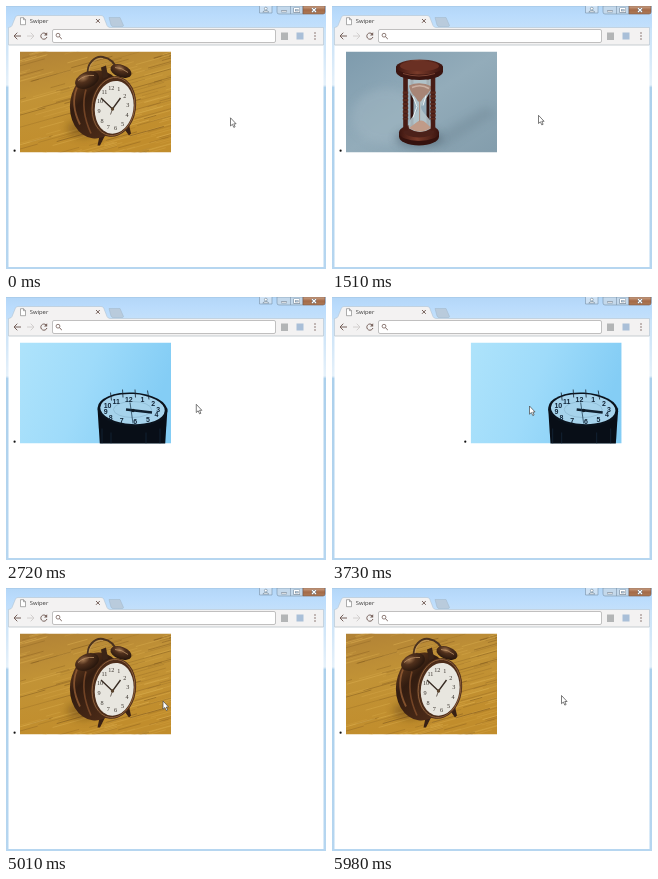
Recreate the animation shown at these times as an HTML page. Size 320x263 px, loop 6280 ms.

```html
<!DOCTYPE html>
<html lang="en">
<head>
<meta charset="utf-8">
<title>Swiper</title>
<style>
  html, body { margin: 0; width: 100%; height: 100%; overflow: hidden; background: #fff; }
  svg { display: block; width: 100vw; height: 100vh; }
  text { font-family: "Open Sans", "Noto Sans", sans-serif; }
  .num { font-family: "Liberation Serif", serif; text-anchor: middle; }
  .icon { fill: none; stroke: #75605a; stroke-width: 1; }
</style>
</head>
<body>
<svg viewBox="0 0 320 263">
  <defs>
    <linearGradient id="bar" x2="0" y2="1">
      <stop offset="0" stop-color="#b3d6f7"/><stop offset=".4" stop-color="#b9dbfc"/><stop offset="1" stop-color="#c3e0fb"/>
    </linearGradient>
    <linearGradient id="edge" x2="0" y2="1">
      <stop offset="0" stop-color="#c0dffa"/><stop offset=".18" stop-color="#d3e7f8"/>
      <stop offset=".3" stop-color="#e6f1fa"/><stop offset=".31" stop-color="#acd0ec"/><stop offset="1" stop-color="#b6d6f0"/>
    </linearGradient>
    <linearGradient id="close" x2="0" y2="1">
      <stop offset="0" stop-color="#cda487"/><stop offset=".5" stop-color="#a46a48"/><stop offset="1" stop-color="#ad7a55"/>
    </linearGradient>
    <linearGradient id="wood" x2=".3" y2="1">
      <stop offset="0" stop-color="#b18236"/><stop offset=".45" stop-color="#c29336"/><stop offset="1" stop-color="#c18d2c"/>
    </linearGradient>
    <linearGradient id="bronze" x2="1" y2="1">
      <stop offset="0" stop-color="#7d4b25"/><stop offset=".35" stop-color="#321c10"/><stop offset="1" stop-color="#55301a"/>
    </linearGradient>
    <radialGradient id="bell" cx=".4" cy=".3" r=".75">
      <stop offset="0" stop-color="#a0744e"/><stop offset=".35" stop-color="#50301c"/><stop offset="1" stop-color="#22130b"/>
    </radialGradient>
    <linearGradient id="slate" x2="1" y2="1">
      <stop offset="0" stop-color="#7e9bad"/><stop offset=".5" stop-color="#93acba"/><stop offset="1" stop-color="#839dac"/>
    </linearGradient>
    <linearGradient id="mahogany" x2="1" y2="0">
      <stop offset="0" stop-color="#3c1510"/><stop offset=".45" stop-color="#7a3b2a"/><stop offset="1" stop-color="#3a1410"/>
    </linearGradient>
    <linearGradient id="sky" x2="1" y2=".25">
      <stop offset="0" stop-color="#aee3fb"/><stop offset=".5" stop-color="#9edbfa"/><stop offset="1" stop-color="#84cdf5"/>
    </linearGradient>
    <filter id="soft" x="-50%" y="-50%" width="200%" height="200%"><feGaussianBlur stdDeviation="4"/></filter>
    <clipPath id="view"><rect x="5" y="40" width="311" height="120"/></clipPath>
    <clipPath id="photo"><rect width="151" height="101"/></clipPath>
  </defs>

  <!-- window -->
  <rect width="320" height="263" fill="url(#edge)"/>
  <rect width="320" height="22" fill="url(#bar)"/>
  <path d="M0 .3H320" stroke="#9dbdd9" stroke-width=".5"/>
  <rect x="2.5" y="39" width="315" height="222" fill="#fff"/>
  <g stroke="#7890a8" stroke-width=".6">
    <path d="M253.5 0V7H266V0" fill="#cde1f4"/>
    <path d="M271 0V6Q271 8 273 8H297V0Z" fill="#c3d8eb"/>
    <path d="M284.5 0V8"/>
    <path d="M297 0V8H317Q319 8 319 6V0Z" fill="url(#close)" stroke="#7b5543"/>
  </g>
  <g fill="none" stroke="#5e6f80" stroke-width="1.9">
    <path d="M275.3 5.3H280.7M288.5 2.6H293V5.8H288.5ZM306 2.2L310 6M310 2.2L306 6"/>
  </g>
  <g fill="none" stroke="#fff" stroke-width="1.1">
    <path d="M275.5 5.3H280.5M288.5 2.6H293V5.8H288.5ZM306 2.2L310 6M310 2.2L306 6"/>
  </g>
  <g fill="#fff" stroke="#667c91" stroke-width=".6">
    <path d="M256.8 6Q259.8 2.6 262.8 6Z"/><circle cx="259.8" cy="2.6" r="1.4"/>
  </g>

  <!-- tabs -->
  <path d="M103 11.5H114L117.5 19.5Q117.5 20.5 116 20.5H107Q105.7 20.5 105 19Z" fill="#b9cbdc" stroke="#9fb4c7" stroke-width=".5"/>
  <path d="M2.5 21.5Q5 21.5 6 19.5L9.5 11Q10.2 9.5 12 9.5H95Q97 9.5 97.7 11L101 19.5Q102 21.5 104 21.5H317.5V39H2.5Z" fill="#f3f2f2" stroke="#abbccb" stroke-width=".5"/>
  <path d="M14.5 11.7H17.5L19.5 13.7V18.7H14.5ZM17.5 11.7V13.7H19.5" fill="#fff" stroke="#777" stroke-width=".6"/>
  <text x="23.7" y="17.3" font-size="5.9" fill="#3d3d3d">Swiper</text>
  <path d="M90 13L93.8 16.8M93.8 13L90 16.8" class="icon"/>

  <!-- toolbar -->
  <path d="M3 39H317" stroke="#d2d2d2" stroke-width=".6"/>
  <path d="M15 30H8M11.3 26.7L8 30L11.3 33.3" class="icon"/>
  <path d="M21 30H28M24.7 26.7L28 30L24.7 33.3" class="icon" style="stroke:#d2cfce"/>
  <path d="M40.2 28A3.1 3.1 0 1 0 40.9 31" class="icon"/>
  <path d="M41.2 26.2V29.4H38Z" fill="#75605a"/>
  <rect x="46.5" y="23.5" width="223" height="13" rx="1.5" fill="#fff" stroke="#b2b2b2" stroke-width=".8"/>
  <circle cx="52" cy="29.2" r="1.9" class="icon" style="stroke-width:.8"/>
  <path d="M53.4 30.7L55.8 33" class="icon"/>
  <rect x="275" y="26.5" width="7" height="7.5" fill="#b3b5b6"/>
  <rect x="290.5" y="26.5" width="7" height="7" fill="#a9bfd8"/>
  <g fill="#75605a"><circle cx="309" cy="27" r=".75"/><circle cx="309" cy="30" r=".75"/><circle cx="309" cy="33" r=".75"/></g>

  <g clip-path="url(#view)"><g id="track">
    <!-- alarm clock -->
    <g class="slide"><g clip-path="url(#photo)">
      <rect width="151" height="101" fill="url(#wood)"/>
      <g id="grain" fill="none"></g>
      <ellipse cx="64" cy="77" rx="17" ry="9" fill="#4f300f" opacity=".4" filter="url(#soft)"/>
      <path d="M80 82L77.5 94L80 94L85 84ZM104 77L109 84L111 82L109 73Z" fill="#382014"/>
      <path d="M68 24C66 12 75 4 83 5.5C91 7 95 11 97 19" fill="none" stroke="#4b321e" stroke-width="1.9"/>
      <path d="M69 20C69 12 76 6.5 83 7" fill="none" stroke="#c79f6c" stroke-width=".6"/>
      <ellipse cx="77" cy="53" rx="27" ry="34" transform="rotate(8 77 53)" fill="url(#bronze)"/>
      <path d="M57 36Q50 53 60 73" fill="none" stroke="#a1653a" stroke-width="1.8" opacity=".7"/>
      <path d="M66 38Q60 58 71 82" fill="none" stroke="#8a532e" stroke-width="1.6" opacity=".7"/>
      <ellipse cx="67" cy="28.5" rx="12.5" ry="8" transform="rotate(-24 67 28.5)" fill="url(#bell)"/>
      <ellipse cx="101" cy="19.5" rx="11" ry="6.2" transform="rotate(20 101 19.5)" fill="url(#bell)"/>
      <path d="M58 29Q65 23 74 24M95 16Q102 16 108 21" fill="none" stroke="#c3986c" stroke-width=".9" opacity=".8"/>
      <path d="M81 16L86 14L88 25L83 27Z" fill="#3b2416"/>
      <ellipse cx="93.5" cy="55" rx="22.5" ry="30.5" transform="rotate(8 93.5 55)" fill="#4c2c19"/>
      <ellipse cx="93.5" cy="55" rx="21.2" ry="29.2" transform="rotate(8 93.5 55)" fill="none" stroke="#9a6941" stroke-width=".8"/>
      <ellipse cx="94.2" cy="55.8" rx="19.3" ry="26.5" transform="rotate(8 94.2 55.8)" fill="#e8e6df"/>
      <g id="alarmNums" fill="#3a342e"></g>
      <path d="M81 46.5L92.5 57.5L100.5 46.5" fill="none" stroke="#382c24" stroke-width="1.4"/>
      <path d="M92.5 57.5L90.5 63" stroke="#382c24" stroke-width=".7"/>
      <circle cx="92.5" cy="57.5" r="1.7" fill="#59422a"/>
    </g></g>

    <!-- hourglass -->
    <g class="slide"><g clip-path="url(#photo)">
      <rect width="151" height="101" fill="url(#slate)"/>
      <ellipse cx="40" cy="65" rx="34" ry="28" fill="#a3b8c4" opacity=".45" filter="url(#soft)"/>
      <path d="M80 90L140 55L151 62L98 96Z" fill="#5e7684" opacity=".25" filter="url(#soft)"/>
      <ellipse cx="73" cy="87" rx="23" ry="9" fill="#445763" opacity=".5" filter="url(#soft)"/>
      <path d="M53 81V85A20 9 0 0 0 93 85V81Z" fill="#35120e"/>
      <ellipse cx="73" cy="81" rx="20" ry="8.5" fill="url(#mahogany)"/>
      <ellipse cx="73" cy="80" rx="15" ry="6" fill="#4c211a"/>
      <path d="M66 24V76M82 24V76" stroke="#32130f" stroke-width="3"/>
      <path d="M62 28C61 44 71 49 72 56C71 64 61 66 63 77Q74 84 85 77C87 66 77 64 75 56C76 49 87 44 86 28Z" fill="#b6c6cc" opacity=".88"/>
      <path d="M63 34Q74 29 86 35C84 42 77 45 75 50H72C70 45 64 42 63 34Z" fill="#a78576"/>
      <path d="M66 36Q75 32 83 37" fill="none" stroke="#cbb0a2" stroke-width="1.5"/>
      <path d="M63 76C68 74 71 69 75 69C79 69 82 74 85 76Q74 84 63 76Z" fill="#c09b88"/>
      <path d="M73.6 49V70" stroke="#ae8877" stroke-width=".9"/>
      <path d="M67 45L71 55L67 66M80 44L77 54" fill="none" stroke="#edf4f5" stroke-width="1"/>
      <g fill="none" stroke="#481c15" stroke-width="4.6">
        <path d="M59.5 24V79M87 24V79"/>
        <path d="M59.5 40V68M87 40V68" stroke="#5a291d" stroke-width="5.4" stroke-dasharray="2.2 1.6"/>
      </g>
      <path d="M50 15V20A23.5 8.5 0 0 0 97 20V15Z" fill="#3b1510"/>
      <ellipse cx="73.5" cy="15.5" rx="23.5" ry="7.5" fill="url(#mahogany)"/>
      <ellipse cx="73.5" cy="14.5" rx="19.5" ry="5.2" fill="#6a3023"/>
      <path d="M57 22Q73 27 89 22" fill="none" stroke="#7d4434" stroke-width="1"/>
    </g></g>

    <!-- tower clock -->
    <g class="slide"><g clip-path="url(#photo)">
      <rect width="151" height="101" fill="url(#sky)"/>
      <path d="M77.5 66L80 104H145L147.5 66Z" fill="#080e17"/>
      <path d="M82 86V101M91 90V101M126 90V101M140 86V101" stroke="#16283a" stroke-width=".8"/>
      <ellipse cx="112.5" cy="67" rx="35" ry="17" transform="rotate(3 112.5 67)" fill="#0a121c"/>
      <ellipse cx="112.5" cy="66.6" rx="32.3" ry="15" transform="rotate(3 112.5 66.6)" fill="#a6d3ec"/>
      <ellipse cx="112.5" cy="67" rx="19" ry="8" fill="none" stroke="#7faac2" stroke-width=".5"/>
      <path d="M90.5 50L91.5 58M102.5 47L103 55M115 47L115.5 55M127.5 48L129 57" stroke="#182432" stroke-width=".8"/>
      <g id="towerNums" fill="#14273a"></g>
      <path d="M106 67L132 70" stroke="#10202f" stroke-width="2.4"/>
      <path d="M110 60L113 81" stroke="#28445a" stroke-width=".8"/>
      <circle cx="113" cy="68" r="1.8" fill="#101c28"/>
    </g></g>
  </g></g>

  <path id="cursor" d="M0 0V8.2L1.9 6.5L3.3 9.6L4.6 9L3.3 6H5.6Z" fill="#fff" stroke="#444" stroke-width=".7" stroke-linejoin="round"/>
</svg>
<script>
const LOOP = 6280, PITCH = 311;
const $ = id => document.getElementById(id);

function add(parent, name, attrs, text) {
  const el = document.createElementNS("http://www.w3.org/2000/svg", name);
  for (const k in attrs) el.setAttribute(k, attrs[k]);
  if (text) el.textContent = text;
  parent.append(el);
}

let seed = 7;
const rand = () => (seed = seed * 16807 % 2147483647) / 2147483647;

for (let i = 0; i < 190; i++) {
  const x = rand() * 175 - 25, y = rand() * 125, len = 12 + rand() * 35;
  add($("grain"), "path", {
    d: `M${x} ${y}l${len} ${-len * .28}`,
    stroke: rand() < .5 ? "#76501b" : "#e2b656",
    "stroke-width": .4 + rand() * .6, opacity: .25 + rand() * .3
  });
}

function dial(id, cx, cy, rx, ry, size, tilt, extra = {}) {
  for (let n = 1; n <= 12; n++) {
    const a = n * Math.PI / 6 + tilt;
    add($(id), "text", {
      class: "num", "font-size": size, ...extra,
      x: cx + rx * Math.sin(a), y: cy - ry * Math.cos(a) + size * .34
    }, String(n));
  }
}
dial("alarmNums", 93.5, 56.5, 14.5, 20, 6.2, -.15);
dial("towerNums", 112, 68, 26.5, 11.3, 7, -.12, { style: "font-family:'Liberation Sans',sans-serif;font-weight:700" });

document.querySelectorAll(".slide").forEach((s, i) => {
  s.setAttribute("transform", `translate(${14 + i * PITCH} 45.5)`);
  add(s, "circle", { cx: -5.4, cy: 99.2, r: 1.1, fill: "#111" });
});

const linear = u => u;
const smooth = u => u * u * (3 - 2 * u);
// cubic-bezier(.25, .1, .25, 1)
function ease(u) {
  let lo = 0, hi = 1, s = u;
  for (let i = 0; i < 18; i++) {
    s = (lo + hi) / 2;
    const x = .75 * s * (1 - s) + s ** 3;
    if (x < u) lo = s; else hi = s;
  }
  return .3 * s * (1 - s) ** 2 + 3 * s * s * (1 - s) + s ** 3;
}

// [time, x, y]
const pointer = [
  [0, 224.5, 111.8], [50, 224.5, 111.8], [190, 230, 111.5], [430, 230, 111.5],
  [720, 174.5, 111.5], [1040, 174.5, 111.5], [1510, 206.5, 109.3], [1700, 206.5, 109.3],
  [1990, 145, 111], [2500, 144.5, 111], [2710, 190.3, 107.3], [2770, 190.3, 107.3],
  [3050, 140, 109], [3390, 140, 109], [3670, 197.5, 109], [4040, 197.5, 109],
  [4220, 137.5, 109], [4280, 137.5, 109], [4500, 197.5, 109], [4700, 197.5, 109],
  [5010, 157, 113], [5080, 157, 113], [5600, 229.5, 107.5], [LOOP, 229.5, 107.5]
];

// [time, offset, easing into it]
const slide = [
  [0, 0], [430, 0], [720, -55.5, smooth], [1030, -PITCH, ease],
  [1700, -PITCH], [1990, -PITCH - 61.5, smooth], [2290, -2 * PITCH, ease],
  [2770, -2 * PITCH], [3050, -2 * PITCH - 27, smooth], [3090, -2 * PITCH - 27], [3390, -2 * PITCH, ease],
  [3674, -2 * PITCH + 57.5, smooth], [3974, -PITCH, ease],
  [4280, -PITCH], [4500, -PITCH + 60, smooth], [4510, -PITCH + 60], [4810, 0, ease],
  [5080, 0], [5600, 34.5, smooth], [5670, 34.5], [5980, 0, ease], [LOOP, 0]
];

// Bursts of movement: [first change, last change, changes]
const bursts = [
  [50, 190, 3], [440, 1030, 10], [1080, 1510, 6], [1710, 2290, 10], [2340, 2340, 1],
  [2510, 3100, 10], [3150, 3730, 9], [3800, 4370, 9], [4440, 5010, 10], [5080, 5670, 9], [5740, 5980, 5]
];

function snap(t) {
  let at = 0;
  for (const [from, to, n] of bursts) {
    if (t < from) break;
    const step = (to - from) / (n - 1 || 1);
    at = t >= to ? to : from + Math.floor((t - from) / step) * step;
  }
  return at;
}

function segment(keys, t) {
  const i = Math.max(1, keys.findIndex(k => k[0] >= t));
  const a = keys[i - 1], b = keys[i];
  return [a, b, (t - a[0]) / (b[0] - a[0])];
}

function draw(ms) {
  const t = snap(ms % LOOP);
  const [p, q, u] = segment(pointer, t), w = smooth(u);
  $("cursor").setAttribute("transform", `translate(${p[1] + (q[1] - p[1]) * w} ${p[2] + (q[2] - p[2]) * w})`);
  const [a, b, v] = segment(slide, t);
  $("track").setAttribute("transform", `translate(${a[1] + (b[1] - a[1]) * (b[2] || linear)(v)} 0)`);
}

const start = performance.now();
(function tick() {
  draw(performance.now() - start);
  requestAnimationFrame(tick);
})();
</script>
</body>
</html>
```
